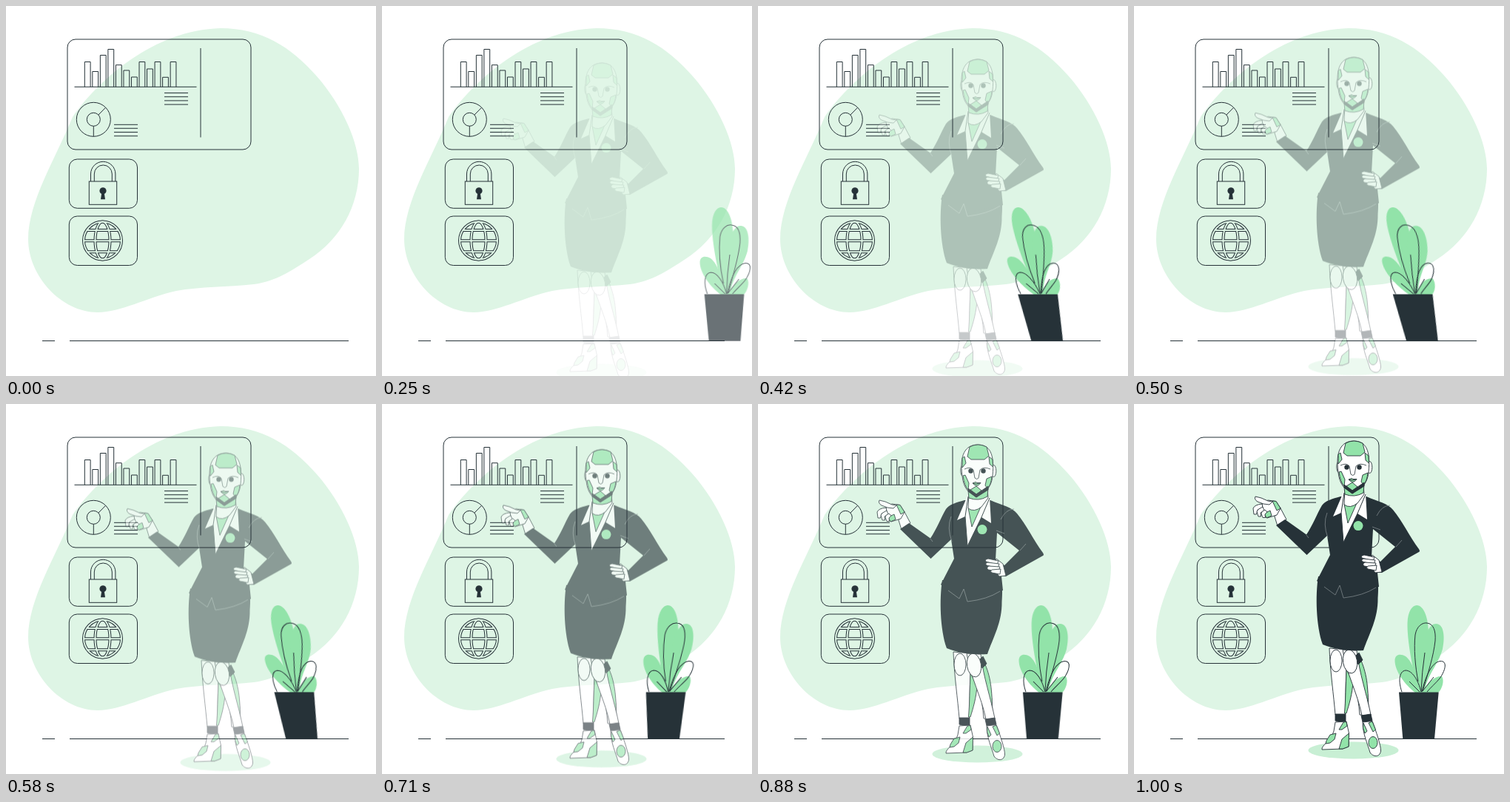
These frames come from a looping animation (500x500 px, 1.04 s). An HTML page:

```html
<!DOCTYPE html>
<html lang="en">
<head>
<meta charset="utf-8">
<title>Robot assistant</title>
<style>
  html, body { margin: 0; width: 100%; height: 100%; overflow: hidden; background: #fff; }
  svg { display: block; width: 100vw; height: 100vh; }
  .line { fill: none; stroke: #263238; stroke-width: 1; }
  .ink { fill: #263238; }
  .green { fill: #92e3a9; }
  .white { fill: #fff; }
  .seam { fill: none; stroke: #7d8689; stroke-width: .8; }
  .edge { stroke: #263238; stroke-width: .9; stroke-linejoin: round; }

  .plant, .robot { animation-play-state: paused; animation-fill-mode: both; }
  .plant {
    transform-origin: 384.5px 362px;
    animation-name: speed-in;
    animation-duration: 980ms;
    animation-delay: -28ms;
    animation-timing-function: cubic-bezier(.36, -.01, .5, 1.38);
  }
  .robot {
    animation-name: rise;
    animation-duration: 870ms;
    animation-delay: 130ms;
    animation-timing-function: cubic-bezier(.4, .26, .7, .66);
  }
  @keyframes speed-in {
    0% { transform: translate(250px) skewX(-20deg); opacity: 0; }
    60% { transform: translate(0) skewX(10deg); opacity: 1; }
    80% { transform: translate(0) skewX(-2deg); opacity: 1; }
    100% { transform: translate(0) skewX(0deg); opacity: 1; }
  }
  @keyframes rise {
    0% { transform: translateY(30px); opacity: 0; }
    100% { transform: translateY(0); opacity: 1; }
  }
</style>
</head>
<body>
<svg viewBox="0 0 500 500">
  <path fill="#def5e5" d="M290 30C345 30 385 55 420 95C455 135 477 185 477 220C477 270 452 315 410 342C385 358 365 372 335 376C300 380 262 379 230 385C190 394 155 414 124 414C75 414 30 365 30 315C30 265 66 208 90 150C125 100 200 32 290 30Z"/>

  <path class="line" d="M49 452.5H66M86 452.5H463"/>

  <g class="line">
    <rect x="83" y="45" width="248" height="149" rx="11"/>
    <path d="M263 57V177.500M92.500 109.300H257.500"/>
    <path id="bars"/>
    <path d="M214 117.500h32m-32 5.200h32m-32 5.200h32m-32 5.200h32M146 160.300h32m-32 5h32m-32 5.200h32m-32 5.200h32"/>
    <circle cx="118.300" cy="153.300" r="23"/>
    <circle cx="118.300" cy="153.300" r="9"/>
    <path d="M118.300 162.300v14M125 147L134.500 137.300"/>

    <rect x="85.300" y="207" width="92.200" height="66.300" rx="11"/>
    <rect x="112.300" y="237" width="37.400" height="31.300"/>
    <path d="M114.500 237V227a16.700 16.700 0 0 1 33.400 0V237M119.300 237V227a12 12 0 0 1 24 0V237"/>

    <rect x="85.300" y="284" width="92.200" height="66.500" rx="11"/>
  </g>
  <circle class="ink" cx="131" cy="249.800" r="4.600"/>
  <path class="ink" d="M129.500 251H132.500L134 261.300H128Z"/>

  <defs>
    <g id="globe" fill="none">
      <circle cx="130.500" cy="317" r="25.500"/>
      <ellipse cx="130.500" cy="317" rx="10" ry="25.500"/>
      <path d="M109.500 303H151.500M105 317.300H156M109.500 332.300H151.500"/>
    </g>
  </defs>
  <use href="#globe" stroke="#263238" stroke-width="4"/>
  <use href="#globe" stroke="#def5e5" stroke-width="2"/>

  <g class="plant">
    <g class="green">
      <path d="M386 390C376 360 369 318 369.500 296C370 280 376 272 382 272C392 272 398 290 398 310C398 340 392 370 390 390Z"/>
      <path d="M387 390C384 350 391 297 408 297C420 297 420 318 417 331C411 353 397 364 392 390Z"/>
      <path d="M380 390C367 380 352 361 352.500 346C353 338 360 337 367 341C377 348 383 372 388 390Z"/>
      <path d="M391 390C396 375 408 367 416 368C420 374 416 386 411 390Z"/>
    </g>
    <g class="line">
      <path d="M384 375C380 355 378 330 380 312C382 300 390 295 396 296C405 297 408 307 407 320C405 340 397 365 390 388M393 336Q389 362 388 389"/>
      <path d="M388 389C384 373 376 360 367 360C358 361 357 375 362 389M372 375L386 389"/>
      <path d="M389 389C393 372 401 349 414 347.500C424 347 421 360 413 371C408 377 400 384 396 389M405 369L390 388"/>
    </g>
    <path class="ink" d="M358 389.500H411.700L406 452.700H363.300Z"/>
  </g>

  <g class="robot">
    <ellipse cx="296.500" cy="468" rx="61" ry="11.500" fill="#c8efd4"/>

    <!-- legs -->
    <g class="edge">
      <path class="white" d="M298 333C306 350 317 368 317 420H305C303 390 294 360 288 340Z"/>
      <path class="green" d="M302 349L307 347C315 366 317 385 316.500 420H311C311 396 308 370 302 349Z"/>
      <path class="white" d="M264 330C265 360 270 395 272 420H285.500C286 395 286 365 289 332Z"/>
      <path class="green" d="M287 359L296 375C295 392 291 405 287 418H284.500C286 400 286 380 287 359Z"/>
      <path class="white" d="M282 332C287 365 302 390 308 421L320 420C315 394 304 362 301 333Z"/>
      <path class="ink" d="M299.500 340L304 336L309 346L303 352Z"/>
      <ellipse class="white" cx="273" cy="347" rx="8" ry="15"/>
      <ellipse class="white" cx="292" cy="348" rx="9.500" ry="16" transform="rotate(-9 292 348)"/>
      <path class="ink" d="M272 419H286V429Q279 431 272 428ZM307 421L320 419L322 428L309 430Z"/>
    </g>

    <!-- shoes -->
    <g class="edge">
      <path class="white" d="M272 430L287 429L290.500 445L290 463L282 466L254 467C253 461 266 456 270 442Z"/>
      <path class="green" d="M277 440L283 430L287 429.500L288 435L281 440ZM260 455L265 447L273 445L271 453L265 458L259 459ZM281 453L290.500 445L290 463L282 466H277Z"/>
      <path class="white" d="M309 430L322 428.500C327 442 334 462 333.500 469C332 478 323 477 319 471C316 460 309 446 309 430Z"/>
      <path class="green" d="M310 431L315 442L312 445L309.500 438ZM317 431L322 429L326.500 440L323 443Z"/>
      <ellipse class="green" cx="323" cy="457.500" rx="6" ry="8"/>
    </g>

    <!-- raised hand -->
    <g class="edge">
      <path class="white" d="M197 139L206 156L194 165L190 152Z"/>
      <path class="white" d="M173 134L181 130L192 131.500L198 141L193 150L180 154L174 149Z"/>
      <path class="green" d="M176 148L184 144L186 151L179 154ZM187 131L192 131.500L198 141L193 144Z"/>
      <path class="white" d="M164 125L172 127L181 131L187 132L183 136L175 135L167 132Q162 129 164 125Z"/>
      <path class="white" d="M173 135Q163 136 161 141L162 149L165.500 149L167 143L174 140Z"/>
      <path class="white" d="M174 139Q167 142 166 145L168 152L171.500 152L171 147L176 144Z"/>
      <path class="white" d="M177 143Q172 145 172 148L174 153.500L177.500 153.500L177 149L180 146Z"/>
    </g>

    <!-- suit -->
    <path class="ink" d="M249 233C245 258 246 300 255 325C272 332 292 334 310 333C318 310 330 290 329.500 262C330.500 250 330 243 329 236Z"/>
    <path class="ink" fill-rule="evenodd" d="M279 125C268 128 258 131 254 137C247 149 242 163 233 176.500L204 156L192 164L233.500 204L261 178L265 204L247 239L257 247L272 258L331 247L329 228L335 228L385 200Q387 199 385 196C373 180 362 157 350 143C343 134 330 132 314 125ZM323 169L353 193L333 213L321 206Z"/>
    <path class="seam" d="M257 247L272 258L278 245L283 262Q310 259 327 248M261 147Q255 162 262 181M328 151Q335 137 346 137M322 166L333 170M354 193L362 184M233 177L236 181"/>

    <!-- hand on hip -->
    <g class="edge white">
      <path d="M322 204L331 211L335 227L326 228L318 217Z"/>
      <path d="M325 207L311 204Q306 205 308 208L323 212Z"/>
      <path d="M326 211L310 209Q306 211 309 213L324 217Z"/>
      <path d="M327 215L312 214Q308 216 311 219L325 221Z"/>
      <path d="M328 218L316 219Q313 221 316 223L327 225Z"/>
    </g>

    <!-- shirt -->
    <path class="white" d="M284 117L269 152L280 147L283 187L302 148L315 156L313 121Z"/>
    <path class="green edge" d="M284 135L289 161L301 134Q294 139 284 135Z"/>
    <path class="line" d="M284 120L280 147L283 187L302 148L313 122"/>
    <circle class="green" cx="303" cy="164.600" r="6.500"/>

    <!-- neck and head -->
    <g class="edge">
      <path class="white" d="M285 116L284 136Q292 142 302 134L311 122L310 110Z"/>
      <path class="green" d="M284 112L285 122Q298 127 310 120L311 108Z"/>
      <ellipse class="white" cx="318.500" cy="85.500" rx="3.300" ry="8"/>
      <ellipse class="white" cx="276.500" cy="85" rx="2.600" ry="7.500"/>
      <path class="white" d="M276 92C272 64 280 50 297 50C313 50 320 62 317 92C316 102 312 109 308 112L295 121L284 113C279 107 277 101 276 92Z"/>
      <path class="green" d="M286 53Q297 47 309 53L312 65L306 70H288L283 66Z"/>
      <path class="green" d="M276 68L279 66L281 75L276 81ZM312 66L317 70L317.500 80L313 76Z"/>
      <path class="green" d="M277 92L280 91L285 102L284 111Q279 106 277 92ZM316 93L309 96L307 105L310 109Q315 104 316 93Z"/>
      <path class="green" d="M287 111L295 106L302 112L295 117Z"/>
      <path class="ink" d="M284 109L295 117L311 106V111L295 121L284 113Z"/>
    </g>
    <path class="line" d="M279 83Q287 79 291 84L293 95Q296 98 298 95L300 84Q305 79 314 83" style="stroke-width:.8"/>
    <circle class="ink" cx="287.500" cy="85.500" r="3.200"/>
    <circle class="ink" cx="304.500" cy="85.500" r="3.200"/>
    <path class="green edge" d="M290 102L294 100.500L296 101.500L301 101.500Q296 109 290 102Z"/>
    <path class="line" d="M290 102Q295 104.500 301 101.500"/>
  </g>
</svg>
<script>
  const LOOP = 1040, FPS = 24;
  const base = 109.3;
  const tops = [75.5, 88.5, 66.5, 58.5, 79.7, 87, 96, 75.5, 85, 75.5, 96.3, 75.5];
  document.getElementById('bars').setAttribute('d',
    tops.map((y, i) => `M${106.3 + i * 10.53} ${base}V${y}h7.8V${base}`).join(''));

  // The motion is held at 24 poses per second.
  const moves = document.getAnimations();
  function pose(now) {
    const tick = Math.floor((now % LOOP + 4) * FPS / 1000);
    for (const move of moves) move.currentTime = tick * 1000 / FPS;
  }
  const start = performance.now();
  function loop() {
    pose(performance.now() - start);
    requestAnimationFrame(loop);
  }
  loop();
</script>
</body>
</html>
```
